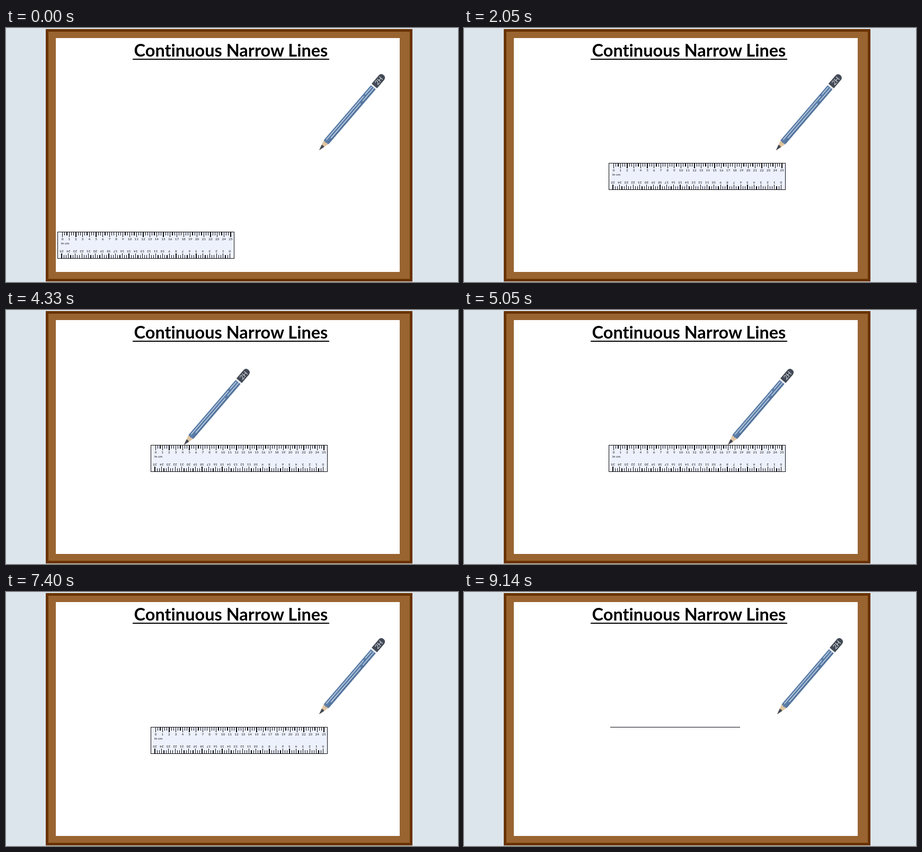
Write an HTML page that moves like this. It is 853 by 480 pixels and loops after 9.2 s.

```html
<!DOCTYPE html>
<html lang="en">
<head>
<meta charset="utf-8">
<title>Continuous Narrow Lines</title>
<style>
  html, body { margin: 0; width: 100%; height: 100%; overflow: hidden; background: #dce5ec; }
  svg { display: block; width: 853px; height: 480px; }
  text { font-family: Lato, Roboto, sans-serif; font-variant-ligatures: none; }
  .title { font-size: 32.5px; font-weight: 700; }
  .scale { font-size: 6.4px; fill: #111; }
  .crisp { shape-rendering: crispEdges; }
</style>
</head>
<body>
<svg viewBox="0 0 853 480">
  <rect x="75" y="2" width="692" height="477" fill="#693300"/>
  <rect x="80" y="7" width="682" height="467" fill="#9a6431"/>
  <rect x="94" y="19" width="649" height="442" fill="#fff"/>
  <text class="title" x="424.5" y="54" text-anchor="middle">Continuous Narrow Lines</text>
  <rect x="239" y="58" width="371" height="2"/>

  <rect id="line" x="276" y="255" width="0" height="1" fill="#0b0b16"/>

  <g id="ruler">
    <rect class="crisp" x=".5" y=".5" width="333" height="50" fill="#edf1fb" stroke="#0c0c10"/>
    <g id="scale"></g>
    <text class="scale" x="7" y="24">In cm</text>
  </g>

  <g id="pencil">
    <g transform="rotate(-49.4)">
      <path d="M21 -6L0 0L21 6Z" fill="#dfc4a0"/>
      <path d="M11 -3.2L0 0L11 3.2Q12.5 0 11 -3.2Z" fill="#454a55"/>
      <path d="M21 -6H157V6H21Q18 4.2 20 2Q17 0 20 -2Q18 -4.2 21 -6Z" fill="#5d7fa9"/>
      <path d="M22 2H157V6H22Z" fill="#55769f"/>
      <path d="M24 -2.7H132M137 -2.7H155M32 2H118M124 2H157" stroke="#dce7f3" stroke-width="1.2"/>
      <rect x="157" y="-6" width="3" height="12" fill="#e9edf2"/>
      <path d="M160 -6.7H181Q187 -6 187 0T181 6.7H160Z" fill="#434a56"/>
      <text x="173" y="4.2" font-size="12" fill="#dfe3e8" text-anchor="middle">2H</text>
    </g>
  </g>
</svg>
<script>
const LOOP = 9200, MOVE = 1660, CLEAR_AT = 9120;
const LINE_START = 276, LINE_LENGTH = 245;

// Each move: start time, from point, to point.
const rulerMoves = [
  [80, [97, 385], [273, 255]],
  [7400, [273, 255], [273, 312]]
];
const pencilMoves = [
  [1950, [591, 231], [276, 255]],
  [3750, [276, 255], [521, 255]],
  [5525, [521, 255], [591, 231]]
];

const $ = id => document.getElementById(id);
const line = $("line"), ruler = $("ruler"), pencil = $("pencil");

function scaleMarkup() {
  const step = 12.7, first = 9.5;
  let ticks = "", labels = "";
  for (let i = 0; i <= 75; i++) {
    const x = first + i * step / 3, whole = i % 3 === 0;
    ticks += `M${x.toFixed(2)} 1v${whole ? 9 : 6}`;
    if (whole) labels += `<text class="scale" x="${x}" y="16" text-anchor="middle">${i / 3}</text>`;
  }
  return `<path class="crisp" d="${ticks}" stroke="#0c0c10" stroke-width="1.2"/>${labels}`;
}
const scale = scaleMarkup();
$("scale").innerHTML = `${scale}<g transform="translate(335 51) rotate(180)">${scale}</g>`;

// Constant acceleration to the middle, then constant braking.
function ease(u) {
  u = Math.min(1, Math.max(0, u));
  return u < .5 ? 2 * u * u : 1 - 2 * (1 - u) ** 2;
}

function position(moves, t) {
  const [start, from, to] = moves.findLast(m => t >= m[0]) || moves[0];
  const p = ease((t - start) / MOVE);
  return from.map((v, i) => v + (to[i] - v) * p);
}

const place = (el, [x, y]) => el.setAttribute("transform", `translate(${x} ${y})`);

function draw(now) {
  const t = now % LOOP;
  place(ruler, position(rulerMoves, t).map(Math.round));
  place(pencil, position(pencilMoves, t));
  ruler.style.visibility = t < CLEAR_AT ? "visible" : "hidden";
  const [, drawStart] = pencilMoves.map(m => m[0]);
  const drawn = t < drawStart ? 0 : LINE_LENGTH * ease((t - drawStart) / MOVE);
  line.setAttribute("width", drawn);
}

let origin;
function tick(now) {
  origin ??= now;
  draw(now - origin);
  requestAnimationFrame(tick);
}
draw(0);
requestAnimationFrame(tick);
</script>
</body>
</html>
```
